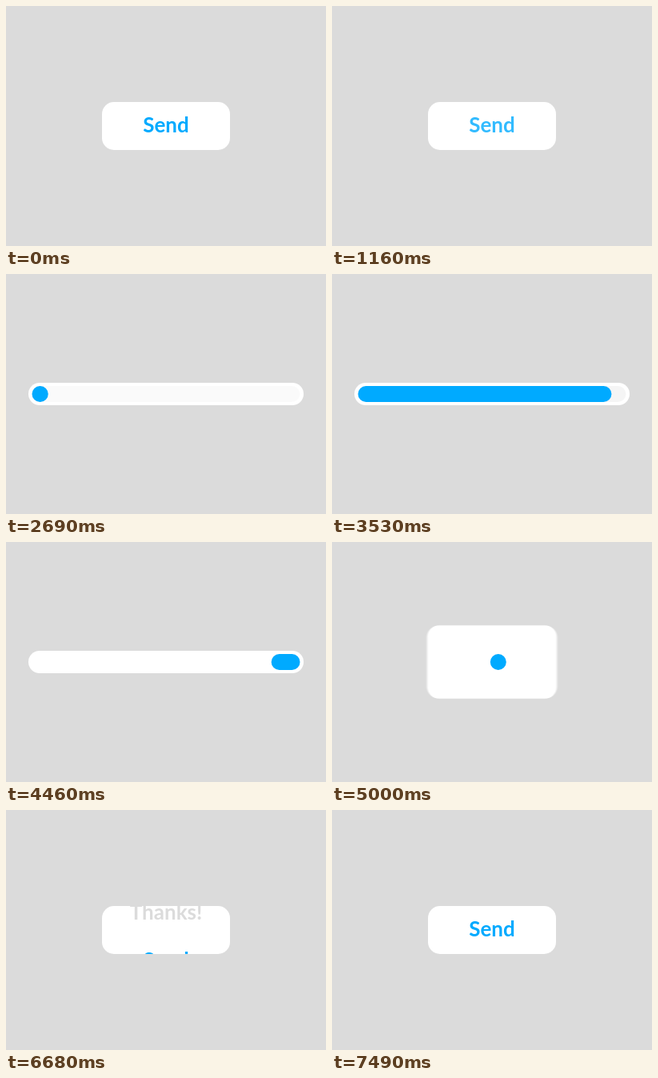
Animation, 400 px wide and 300 px high, one loop 8.27 s. Source, as an HTML page with a canvas:

```html
<!DOCTYPE html>
<html lang="en">
<head>
<meta charset="utf-8">
<title>Send button</title>
<style>
  html, body { margin: 0; width: 100%; height: 100%; overflow: hidden; background: #dbdbdb; }
  canvas { display: block; }
</style>
</head>
<body>
<canvas id="stage" width="400" height="300"></canvas>
<script>
const ctx = document.getElementById('stage').getContext('2d');
const LOOP = 8270, BLUE = '#00aaff', GREY = '#dbdbdb';
const CENTER = 200, LEFT = 42.5, RIGHT = 357.5, DOT = 10;
const BUTTON = [160, 60], SQUARE = [110, 110], PILL = [344, 28];

const mix = (a, b, p) => a + (b - a) * p;
const clamp = x => Math.min(1, Math.max(0, x));

// Cubic Bezier easing with flat ends: control points (x1, 0) and (x2, 1).
function ease(x, x1 = .57, x2 = .43) {
  let low = 0, high = 1;
  for (let i = 0; i < 22; i++) {
    const s = (low + high) / 2, r = 1 - s;
    if (3 * x1 * s * r * r + 3 * x2 * s * s * r + s * s * s < x) low = s;
    else high = s;
  }
  return low * low * (3 - 2 * low);
}

function progress(t, start, end, x1, x2) {
  const x = clamp((t - start) / (end - start));
  return x === 0 || x === 1 ? x : ease(x, x1, x2);
}

// Follows keys of [start, end, value] from a first value.
function follow(t, first, keys) {
  return keys.reduce((value, [start, end, next]) => mix(value, next, progress(t, start, end)), first);
}

const boxKeys = [[1240, 1740, SQUARE], [1742, 2225, PILL], [4680, 5185, SQUARE], [5245, 5745, BUTTON]];
const boxSize = (t, axis) =>
  follow(t, BUTTON[axis], boxKeys.map(([start, end, size]) => [start, end, size[axis]]));

function roundRect(x, y, w, h, r) {
  ctx.beginPath();
  ctx.roundRect(x, y, w, h, Math.min(r, w / 2, h / 2));
  ctx.fill();
}

// Additive samples across the shutter time give the box its motion blur.
function drawBox(t) {
  const samples = 5, shutter = 8;
  ctx.save();
  ctx.globalCompositeOperation = 'lighter';
  ctx.globalAlpha = 1 / samples;
  ctx.fillStyle = '#fff';
  for (let i = 0; i < samples; i++) {
    const time = t + shutter * (i / (samples - 1) - .5);
    const w = boxSize(time, 0), h = boxSize(time, 1);
    roundRect(CENTER - w / 2, 150 - h / 2, w, h, 15);
  }
  ctx.restore();
}

function drawTrack(t) {
  const shade = progress(t, 2450, 2950) - progress(t, 4070, 4550);
  ctx.fillStyle = `rgba(0, 0, 0, ${.04 * shade})`;
  roundRect(LEFT - DOT, 140, RIGHT - LEFT + 2 * DOT, 20, DOT);
}

function drawBar(t) {
  const tail = follow(t, CENTER, [[1960, 2430, LEFT], [4048, 4562, RIGHT], [4675, 5080, CENTER]]);
  const head = follow(t, CENTER, [[1960, 2430, LEFT], [2660, 3760, RIGHT], [4675, 5080, CENTER]]);
  const r = DOT * (progress(t, 1300, 1720) - progress(t, 5245, 5560));
  if (r <= 0) return;
  ctx.fillStyle = BLUE;
  roundRect(tail - r, 150 - r, head - tail + 2 * r, 2 * r, r);
}

function drawText(text, color, opacity, shift) {
  ctx.globalAlpha = opacity;
  ctx.fillStyle = color;
  ctx.fillText(text, CENTER, 158 + shift);
  ctx.globalAlpha = 1;
}

function drawLabels(t) {
  const slide = progress(t, 6265, 7450, .6, .1);
  ctx.save();
  ctx.beginPath();
  ctx.rect(120, 120, 160, 60);
  ctx.clip();
  ctx.font = '700 26px Lato, sans-serif';
  ctx.textAlign = 'center';
  if (t < 3000) drawText('Send', BLUE, 1 - progress(t, 1050, 1370), 0);
  else {
    drawText('Thanks!', GREY, progress(t, 5500, 5990), -60 * slide);
    if (slide > 0) drawText('Send', BLUE, 1, 60 * (1 - slide));
  }
  ctx.restore();
}

function frame() {
  const t = performance.now() % LOOP;
  ctx.clearRect(0, 0, 400, 300);
  drawBox(t);
  drawTrack(t);
  drawBar(t);
  drawLabels(t);
  requestAnimationFrame(frame);
}
frame();
</script>
</body>
</html>
```
